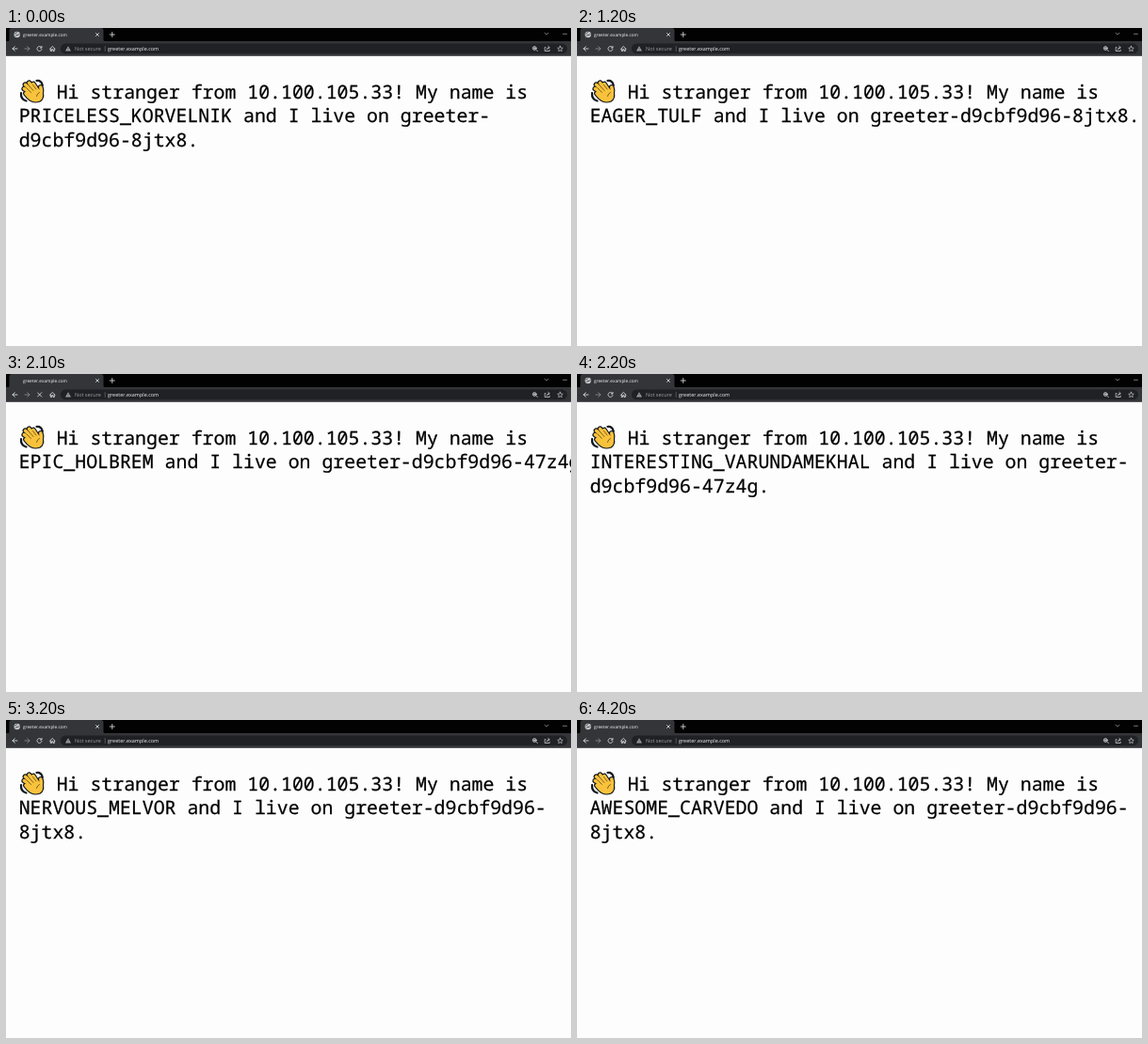
An HTML page for the animation above (5 s loop, 600 px wide and 338 px high).

```html
<!DOCTYPE html>
<html lang="en">
<head>
<meta charset="utf-8">
<title>Greeter</title>
<style>
  html, body { margin: 0; width: 100%; height: 100%; overflow: hidden; background: #fdfdfd; }
  svg { display: block; }
  text { white-space: pre; text-rendering: geometricPrecision; }
  .ui { font-family: "Open Sans", "Noto Sans", sans-serif; fill: #f2f3f5; }
  .message {
    font: 19.87px "Noto Sans Mono", "DejaVu Sans Mono", monospace;
    fill: #000; stroke: #000; stroke-width: .25;
  }
  .icon { fill: none; stroke: #dfe0e3; stroke-width: .85; stroke-linecap: round; stroke-linejoin: round; }
  .dim { stroke: #8b8c8f; }

  .greetings, .idle, .busy { animation: 5s step-end infinite; }
  .greetings { animation-name: greet; }
  .idle { animation-name: idle; }
  .busy { animation-name: busy; }

  @keyframes greet {
    0% { transform: translateY(0); }
    6% { transform: translateY(-60px); }
    26% { transform: translateY(-120px); }
    44% { transform: translateY(-180px); }
    64% { transform: translateY(-240px); }
    84%, 100% { transform: translateY(-300px); }
  }
  @keyframes idle {
    0%, 24%, 44%, 62%, 84%, 100% { opacity: 1; }
    22%, 42%, 60%, 82% { opacity: 0; }
  }
  @keyframes busy {
    0%, 24%, 44%, 62%, 84%, 100% { opacity: 0; }
    22%, 42%, 60%, 82% { opacity: 1; }
  }
</style>
</head>
<body>
<svg width="600" height="338" viewBox="0 0 600 338">
  <rect width="600" height="338" fill="#fdfdfd"/>

  <!-- Browser window -->
  <rect width="600" height="15" fill="#020202"/>
  <rect y="14" width="600" height="15.8" fill="#343538"/>
  <path d="M1.500 14.5Q3.500 14.5 3.500 12.500V2.500Q3.500 0 6 0H101Q103.500 0 103.500 2.500V12.500Q103.500 14.5 105.500 14.5Z" fill="#343538"/>
  <rect x="58" y="16.500" width="538" height="10.800" rx="5.400" fill="#202124"/>

  <g class="ui">
    <text x="18" y="8.700" font-size="4.750">greeter.example.com</text>
    <text x="73" y="23.800" font-size="5.500" fill="#a0a2a6">Not secure</text>
    <text x="108" y="23.800" font-size="5.480">greeter.example.com</text>
  </g>

  <g class="icon">
    <path d="M95.500 5.500l3 3m0-3l-3 3M110.300 7h5m-2.500-2.500v5"/>
    <path d="M12 22H7m2.300-2.300L7 22l2.300 2.300"/>
    <path d="M46.500 22.300L49.300 19.500l2.800 2.800M47.300 22v2.500h1.300v-1.800h1.400v1.800h1.300V22"/>
    <g class="dim">
      <path d="M20 22h5m-2.300-2.300L25 22l-2.300 2.300"/>
      <path d="M572 5.200l2 2 2-2M591.500 6.300h4"/>
      <path d="M105.200 19.500v5" stroke-width=".5"/>
    </g>
    <circle cx="561.300" cy="21.500" r="1.900"/>
    <path d="M562.800 23l1.700 1.700M560.500 21.500h1.600m-.8-.8v1.600" stroke-width=".7"/>
    <path d="M573 20.500h-.8v4h5v-1.300M574 23q.3-2.300 3-2.300m-1.200-1.300l1.400 1.300-1.400 1.300" stroke-width=".7"/>
    <path d="M588.500 19.200l.8 1.900 2 .2-1.500 1.400.4 2-1.700-1-1.700 1 .4-2-1.500-1.400 2-.2z" stroke-width=".6"/>
  </g>
  <path d="M66 19.300l3 5.200h-6z" fill="#a0a2a6"/>
  <path d="M66 21.200v1.400m0 .5v.6" stroke="#202124" stroke-width=".6"/>

  <g class="idle">
    <circle cx="11.700" cy="7" r="3.200" fill="#c4c6c9"/>
    <path d="M9.300 6q2-.2 2.300-1.700M10 8.800q.8-1.700 2-1.300T14.200 6.200" fill="none" stroke="#343538" stroke-width=".8"/>
    <path class="icon" d="M37.500 20.400a2.500 2.500 0 1 0 .5 2.200M38 19.500v1.600h-1.600"/>
  </g>
  <path class="icon busy" d="M33.500 19.800l4.300 4.300m0-4.300l-4.300 4.300"/>

  <!-- Waving hand -->
  <defs>
    <g id="hand" stroke-linecap="round" stroke-linejoin="round">
      <path d="M28 70L19.300 64.500M29 68L20.500 60.300M31 67L24.500 58.300M34 67L29 59.500M36.500 71Q38.300 67.500 36.800 63" fill="none"/>
      <path d="M28 68L33 66L37 69Q38.300 74 35 76Q29 78 24.500 73.500L21 69.500Z"/>
    </g>
  </defs>
  <g fill="none" stroke="#10161c" stroke-width="2.200" stroke-linecap="round">
    <path d="M32.500 56Q37.500 55.500 38.800 61M16 69Q15.500 76 21.500 77.500"/>
  </g>
  <use href="#hand" stroke="#10161c" stroke-width="5.800" fill="#10161c"/>
  <use href="#hand" stroke="#f9c23c" stroke-width="3.500" fill="#f9c23c"/>
  <path d="M26.500 68.500L22 64M29 66.500L24.500 61.500M32 65L28.500 60.500M32.500 72.500Q33 69.500 35.500 68.500" fill="none" stroke="#4a3812" stroke-width=".7" stroke-linecap="round"/>

  <!-- Greeting -->
  <g class="message">
    <text x="53.700" y="74.700">Hi stranger from 10.100.105.33! My name is</text>
    <svg y="80" width="600" height="60" overflow="hidden">
      <g class="greetings">
        <text x="13.700" y="20.300">PRICELESS_KORVELNIK and I live on greeter-<tspan x="13.700" dy="25.300">d9cbf9d96-8jtx8.</tspan></text>
        <text x="13.700" y="80.300">EAGER_TULF and I live on greeter-d9cbf9d96-8jtx8.</text>
        <text x="13.700" y="140.300">EPIC_HOLBREM and I live on greeter-d9cbf9d96-47z4g.</text>
        <text x="13.700" y="200.300">INTERESTING_VARUNDAMEKHAL and I live on greeter-<tspan x="13.700" dy="25.300">d9cbf9d96-47z4g.</tspan></text>
        <text x="13.700" y="260.300">NERVOUS_MELVOR and I live on greeter-d9cbf9d96-<tspan x="13.700" dy="25.300">8jtx8.</tspan></text>
        <text x="13.700" y="320.300">AWESOME_CARVEDO and I live on greeter-d9cbf9d96-<tspan x="13.700" dy="25.300">8jtx8.</tspan></text>
      </g>
    </svg>
  </g>
</svg>
</body>
</html>
```
